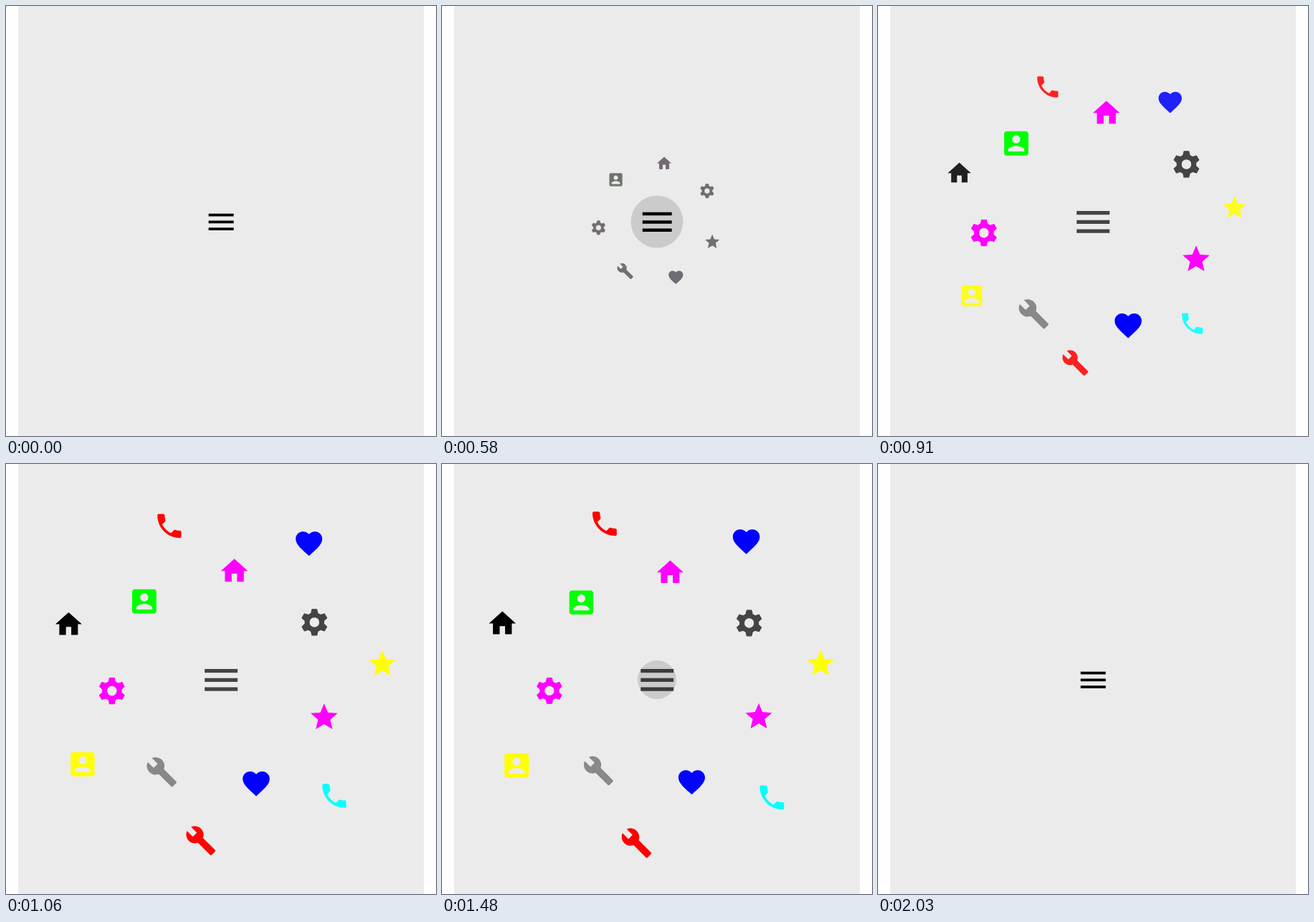
Animation, 600 px wide and 600 px high, one loop 2.06 s. Source, as an HTML page:

```html
<!DOCTYPE html>
<html lang="en">
<head>
<meta charset="utf-8">
<title>Radial menu</title>
<style>
  html, body { margin: 0; width: 100%; height: 100%; overflow: hidden; background: #fefefe; }
  svg { display: block; width: 100%; height: 100%; }
</style>
</head>
<body>
<svg id="stage" viewBox="0 0 600 600">
  <rect x="17" width="566" height="600" fill="#ebebeb"/>
  <g id="icons"></g>
  <path id="menu" d="M3 6h18v2H3zM3 11h18v2H3zM3 16h18v2H3z"/>
  <circle id="ripple" cx="300" cy="301"/>
</svg>
<script>
const LOOP = 2060;
const CX = 300, CY = 301;
const ICON_SCALE = 1.88;
const RIPPLE_RADIUS = 36.5;

function gearPath() {
  const points = [];
  for (let tooth = 0; tooth < 6; tooth++) {
    for (const [offset, r] of [[-20.5, 7.1], [-10.5, 9.8], [10.5, 9.8], [20.5, 7.1]]) {
      const a = (tooth * 60 + 30 + offset) * Math.PI / 180;
      points.push(`${12 + r * Math.cos(a)} ${12 + r * Math.sin(a)}`);
    }
  }
  return `M${points.join('L')}ZM15.9 12a3.9 3.9 0 1 0-7.8 0 3.9 3.9 0 1 0 7.8 0z`;
}

const shapes = {
  home: 'M10 20v-6h4v6h5v-8h3L12 3 2 12h3v8z',
  gear: gearPath(),
  star: 'M12 17.27 18.18 21l-1.64-7.03L22 9.24l-7.19-.61L12 2 9.19 8.63 2 9.24l5.46 4.73L5.82 21z',
  heart: 'M12 21.35l-1.45-1.32C5.4 15.36 2 12.28 2 8.5 2 5.42 4.42 3 7.5 3c1.74 0 3.41.81 4.5 2.09C13.09 3.81 14.76 3 16.5 3 19.58 3 22 5.42 22 8.5c0 3.78-3.4 6.86-8.55 11.54z',
  wrench: 'M22.7 19l-9.1-9.1c.9-2.3.4-5-1.5-6.9-2-2-5-2.4-7.4-1.3L9 6 6 9 1.6 4.7C.4 7.1.9 10.1 2.9 12.1c1.9 1.9 4.6 2.4 6.9 1.5l9.1 9.1c.4.4 1 .4 1.4 0l2.3-2.3c.5-.4.5-1.1.1-1.4z',
  phone: 'M6.62 10.79c1.44 2.83 3.76 5.14 6.59 6.59l2.2-2.2c.27-.27.67-.36 1.02-.24 1.12.37 2.33.57 3.57.57.55 0 1 .45 1 1V20c0 .55-.45 1-1 1C10.61 21 3 13.39 3 4c0-.55.45-1 1-1h3.5c.55 0 1 .45 1 1 0 1.25.2 2.45.57 3.57.11.35.03.74-.25 1.02z',
  person: 'M3 5v14c0 1.1.89 2 2 2h14c1.1 0 2-.9 2-2V5c0-1.1-.9-2-2-2H5c-1.11 0-2 .9-2 2zm12 4c0 1.66-1.34 3-3 3s-3-1.34-3-3 1.34-3 3-3 3 1.34 3 3zm-9 8c0-2 4-3.1 6-3.1s6 1.1 6 3.1v1H6z'
};

const magenta = [255, 0, 255], blue = [0, 0, 255], red = [255, 0, 0];
const yellow = [255, 255, 0], charcoal = [68, 68, 68];

// drift: how far a small ring sits up and left; settled: progress at which it is centred
const rings = [
  {
    radius: 153, start: -83, drift: 24, settled: 0.5,
    open: [528, 170], close: [1473, 313],
    items: [['home', magenta], ['gear', charcoal], ['star', magenta], ['heart', blue],
      ['wrench', [136, 136, 136]], ['gear', magenta], ['person', [0, 255, 0]]]
  },
  {
    radius: 229.6, start: 200, drift: 30, settled: 0.85,
    open: [597, 550], close: [1582, 450],
    items: [['home', [0, 0, 0]], ['phone', red], ['heart', blue], ['star', yellow],
      ['phone', [0, 255, 255]], ['wrench', red], ['person', yellow]]
  }
];

const presses = [
  { down: 30, up: 440, fade: 665 },
  { down: 1120, up: 1470, fade: 1705 }
];

const $ = id => document.getElementById(id);
const clamp = x => Math.min(1, Math.max(0, x));
const ramp = (t, start, length) => clamp((t - start) / length);
const tint = (color, k) => `rgb(${color.map(c => Math.round(c * k)).join()})`;

// cubic-bezier(.25, .1, .25, 1)
function ease(x) {
  if (x <= 0 || x >= 1) return clamp(x);
  const bezier = (s, a, b) => 3 * s * (1 - s) ** 2 * a + 3 * s * s * (1 - s) * b + s ** 3;
  let low = 0, high = 1;
  for (let i = 0; i < 24; i++) {
    const mid = (low + high) / 2;
    if (bezier(mid, 0.25, 0.25) < x) low = mid; else high = mid;
  }
  return bezier(low, 0.1, 1);
}

for (const ring of rings) {
  ring.nodes = ring.items.map(([shape]) => {
    const node = document.createElementNS('http://www.w3.org/2000/svg', 'path');
    node.setAttribute('d', shapes[shape]);
    node.setAttribute('fill-rule', 'evenodd');
    if (shape === 'gear') {
      node.setAttribute('stroke-width', 0.6);
      node.setAttribute('stroke-linejoin', 'round');
    }
    return $('icons').appendChild(node);
  });
}

function place(node, x, y, scale) {
  node.setAttribute('transform', `translate(${x} ${y}) scale(${scale}) translate(-12 -12)`);
}

function drawRing(ring, t, colorMix) {
  const p = ease(ramp(t, ...ring.open)) - ease(ramp(t, ...ring.close));
  const shift = ring.drift * Math.max(0, 1 - p / ring.settled);
  ring.nodes.forEach((node, i) => {
    const angle = (ring.start + i * 360 / 7) * Math.PI / 180;
    const color = tint(ring.items[i][1], colorMix);
    const r = ring.radius * p;
    place(node, CX + r * Math.cos(angle) - shift, CY + r * Math.sin(angle) - shift, ICON_SCALE * p);
    node.setAttribute('fill', color);
    if (node.hasAttribute('stroke-width')) node.setAttribute('stroke', color);
    node.setAttribute('opacity', p);
  });
  return p;
}

function drawRipple(t) {
  const { down, up, fade } = presses[t < presses[1].down ? 0 : 1];
  const held = 0.3 + 0.7 * ease((Math.min(t, up) - down) / 1000);
  const size = held + (1 - held) * ease(ramp(t, up, 150));
  $('ripple').setAttribute('r', RIPPLE_RADIUS * size);
  $('ripple').setAttribute('opacity', 0.137 * (ramp(t, down, 75) - ramp(t, fade, 150)));
}

function draw(t) {
  const colorMix = ramp(t, 570, 250) - ramp(t, 1525, 210);
  const [inner] = rings.map(ring => drawRing(ring, t, colorMix));
  place($('menu'), 300.2, 301.4, 1.944 + 0.612 * inner);
  $('menu').setAttribute('fill', tint(charcoal, colorMix));
  drawRipple(t);
}

const began = performance.now();
function tick() {
  draw((performance.now() - began) % LOOP);
  requestAnimationFrame(tick);
}
tick();
</script>
</body>
</html>
```
